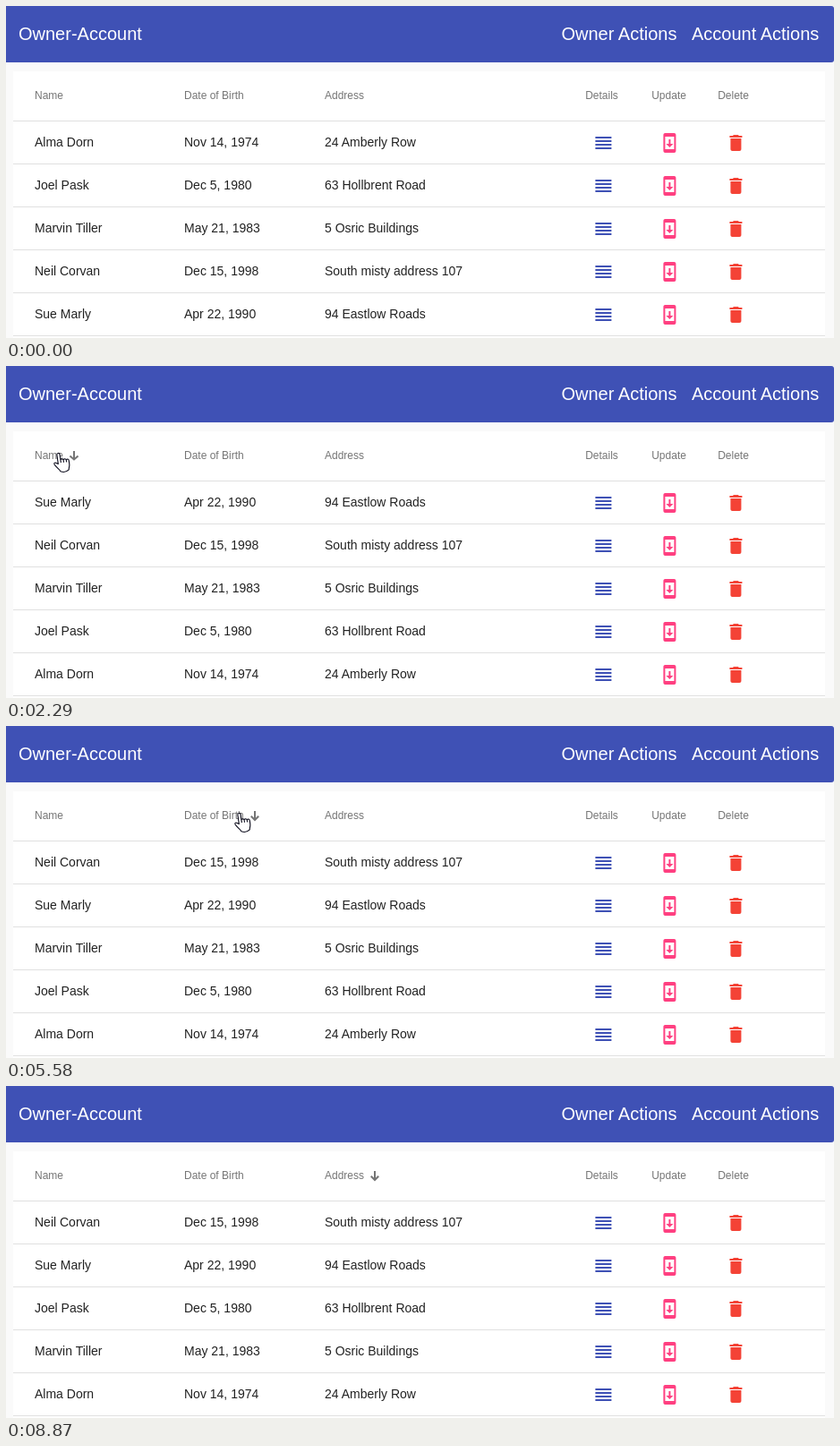
These frames come from a looping animation (925 px wide and 371 px high, 9.44 s). An HTML page:

```html
<!DOCTYPE html>
<html lang="en">
<head>
<meta charset="utf-8">
<title>Sortable owner table</title>
<style>
  html, body { margin: 0; width: 100%; height: 100%; overflow: hidden; background: #fafafa; }
  svg { display: block; font-family: "Liberation Sans", Arial, sans-serif; }
  .nav { font-size: 20px; fill: #fff; }
  .head { font-size: 12px; fill: rgba(0, 0, 0, .54); }
  .cell { font-size: 14px; fill: rgba(0, 0, 0, .87); }
  .arrow { fill: none; stroke: #757575; stroke-width: 2; }
  .cursor { fill: #fff; stroke: #0c0c1c; stroke-width: 1.2; stroke-linejoin: round; }
</style>
</head>
<body>
<svg id="stage" width="925" height="371" viewBox="0 0 925 371">
  <defs>
    <g id="icons">
      <path transform="translate(655.4)" fill="#3f51b5" d="M3 15h18v-2H3zm0 4h18v-2H3zm0-8h18V9H3zm0-6v2h18V5z"/>
      <path transform="translate(729.4)" fill="#ff4081" d="M17 1H7c-1.1 0-2 .9-2 2v18c0 1.1.9 2 2 2h10c1.1 0 2-.9 2-2V3c0-1.1-.9-2-2-2zm0 18H7V5h10zm-1-6h-3V8h-2v5H8l4 4z"/>
      <path transform="translate(803.4)" fill="#f44336" d="M6 19c0 1.1.9 2 2 2h8c1.1 0 2-.9 2-2V7H6zM19 4h-3.5l-1-1h-5l-1 1H5v2h14z"/>
    </g>
  </defs>
  <path fill="#3f51b5" d="M0 0H922q3 0 3 3V60q0 3-3 3H0z"/>
  <g class="nav">
    <text x="14" y="38">Owner-Account</text>
    <text x="620.5" y="38">Owner Actions</text>
    <text x="766" y="38">Account Actions</text>
  </g>
  <path fill="#fff" d="M8 73H915V371H8z"/>
</svg>
<script>
const LOOP = 9440, FADE = 200, TICK = 70, SAMPLES = 20, HINT = .54;
const stage = document.getElementById('stage');

function add(tag, attrs, text = '', parent = stage) {
  const el = document.createElementNS('http://www.w3.org/2000/svg', tag);
  for (const key in attrs) el.setAttribute(key, attrs[key]);
  el.textContent = text;
  return parent.appendChild(el);
}

const columns = [
  { label: 'Name', x: 32, arrowX: 76 },
  { label: 'Date of Birth', x: 199, arrowX: 278 },
  { label: 'Address', x: 356, arrowX: 412 }
];
const people = [
  ['Alma Dorn', 'Nov 14, 1974', '24 Amberly Row'],
  ['Joel Pask', 'Dec 5, 1980', '63 Hollbrent Road'],
  ['Marvin Tiller', 'May 21, 1983', '5 Osric Buildings'],
  ['Neil Corvan', 'Dec 15, 1998', 'South misty address 107'],
  ['Sue Marly', 'Apr 22, 1990', '94 Eastlow Roads']
];

// Clicks on a header: press, release, column
const clicks = [
  [1350, 1470, 0], [1980, 2110, 0], [2920, 2980, 0],
  [4260, 4330, 1], [5200, 5380, 1],
  [6900, 7080, 2], [7840, 7970, 2]
];

// Cursor moves: start, end, x, y
const entry = { x: 230, y: 330 }, shown = [300, 8870];
const moves = [
  [300, 510, 58, 100], [1110, 1110, 58, 98], [1670, 1670, 58, 97],
  [3190, 3540, 150, 102], [3680, 3930, 260, 97],
  [5830, 6010, 330, 103], [6150, 6320, 391, 99],
  [8580, 8870, 600, 352]
];

// Fixed table parts
columns.forEach(c => add('text', { class: 'head', x: c.x, y: 104 }, c.label));
['Details', 'Update', 'Delete'].forEach((label, i) =>
  add('text', { class: 'head', x: 647.2 + 74 * i, y: 104 }, label));
for (let y = 128; y < 371; y += 48) {
  add('rect', { x: 8, y, width: 907, height: 1, fill: '#e0e0e0' });
  if (y < 368) add('use', { href: '#icons', y: y + 13 });
}

// Moving parts
const rows = people.map(person => {
  const row = add('g', { class: 'cell' });
  person.forEach((text, i) => add('text', { x: columns[i].x }, text, row));
  return row;
});
const arrows = columns.map(c =>
  add('path', { class: 'arrow', transform: `translate(${c.arrowX} 100)` }));
const spot = add('circle', { r: 12, fill: '#ff0', 'fill-opacity': .62 });
const cursor = add('g', { class: 'cursor' });
const hand = add('path', { transform: 'rotate(-8) scale(.95)', d: 'M-1.5 13V2.2a1.7 1.7 0 0 1 3.4 0V9q0-1.2 1.6-1.2t1.7 1.4q.2-1 1.6-1t1.7 1.5q.2-.8 1.4-.8 1.6 0 1.6 1.8V15c0 3-1.5 4-1.5 6.5Q5 25 0 22c-1-2.5-4.5-5.5-6-9-.6-1.6.8-2.6 2-1.6zM1.9 9v3M5.2 9.2v3M8.5 9.7v2.5' }, '', cursor);
const pointer = add('path', { d: 'M0 0V17l4-3.8 2.7 6 2.4-1-2.6-5.8H12z' }, '', cursor);

const smooth = p => p * p * (3 - 2 * p);
const mix = (a, b, p) => a + (b - a) * p;
const show = (el, on) => el.setAttribute('visibility', on ? 'visible' : 'hidden');

// Each click on a column cycles it: up (1), down (-1), unsorted (0)
function sortAt(t) {
  let col = 0, dir = 0;
  for (const [, release, c] of clicks) {
    if (t < release) break;
    dir = c !== col || dir === 0 ? 1 : dir === 1 ? -1 : 0;
    col = c;
  }
  return { col, dir };
}

function cursorAt(t) {
  let { x, y } = entry;
  for (const [from, to, endX, endY] of moves) {
    if (t < from) break;
    const ticks = Math.floor((t - from) / TICK) + 1;
    const p = smooth(Math.min(1, ticks * TICK / (to - from + TICK)));
    x = mix(x, endX, p);
    y = mix(y, endY, p);
  }
  const hover = y > 92 && y < 108
    ? columns.findIndex(c => x > c.x && x < c.arrowX + 6) : -1;
  return { x: Math.round(x), y: Math.round(y), hover };
}

const sortKey = (person, col) => col === 1 ? Date.parse(person[1]) : person[col];

function drawRows(t) {
  const { col, dir } = sortAt(t);
  const order = people.map((_, i) => i);
  if (dir) order.sort((a, b) =>
    sortKey(people[a], col) < sortKey(people[b], col) ? -dir : dir);
  order.forEach((person, place) =>
    rows[person].setAttribute('transform', `translate(0 ${157 + 48 * place})`));
}

// Averaging the state over the last FADE ms gives the transition
function drawArrow(el, col, t) {
  let opacity = 0, down = 0;
  for (let i = 0; i < SAMPLES; i++) {
    const past = t - i * FADE / SAMPLES, sort = sortAt(past);
    const active = sort.col === col && sort.dir !== 0;
    opacity += (active ? 1 : cursorAt(past).hover === col ? HINT : 0) / SAMPLES;
    down += (active && sort.dir < 0 ? 1 : 0) / SAMPLES;
  }
  const angle = Math.PI / 4 * (1 - 2 * down), tip = 10 * down - 5;
  const dx = 6 * Math.cos(angle), y = tip + 6 * Math.sin(angle);
  el.setAttribute('d', `M0-5V5M${-dx} ${y}L0 ${tip}L${dx} ${y}`);
  el.setAttribute('opacity', opacity);
}

function drawCursor(t) {
  const { x, y, hover } = cursorAt(t);
  const visible = t >= shown[0] && t < shown[1];
  cursor.setAttribute('transform', `translate(${x} ${y})`);
  show(hand, visible && hover >= 0);
  show(pointer, visible && hover < 0);
  spot.setAttribute('cx', x);
  spot.setAttribute('cy', y);
  show(spot, clicks.some(([press, release]) => t >= press && t < release));
}

function frame() {
  const t = performance.now() % LOOP;
  drawRows(t);
  arrows.forEach((el, col) => drawArrow(el, col, t));
  drawCursor(t);
  requestAnimationFrame(frame);
}
frame();
</script>
</body>
</html>
```
